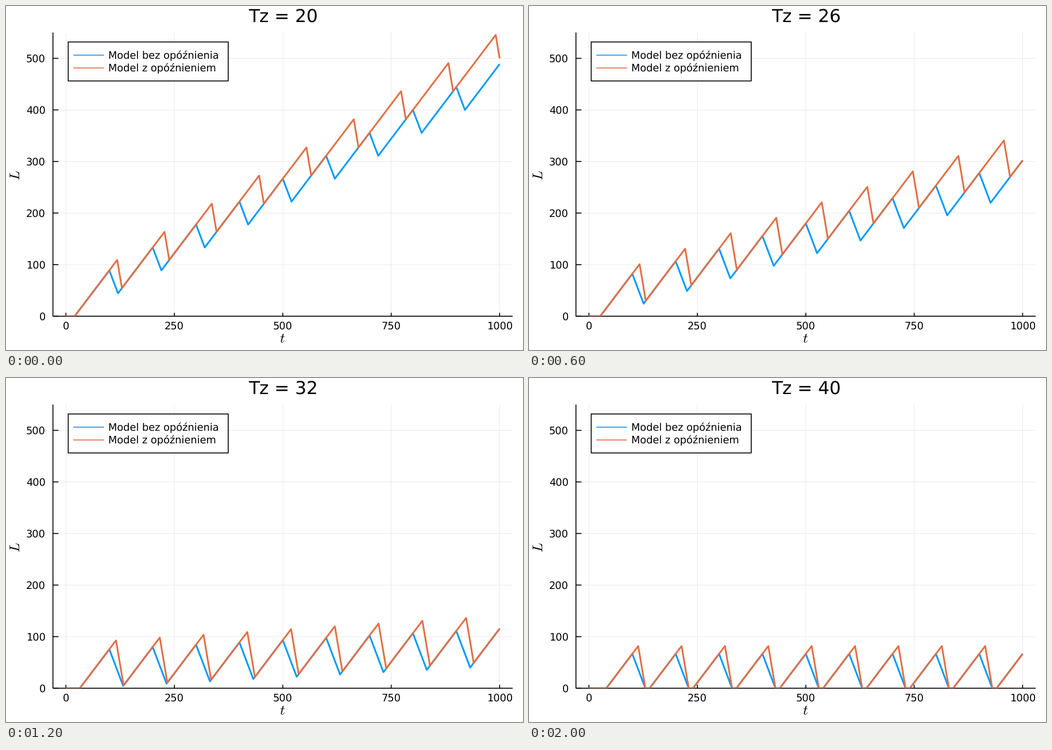
Write a matplotlib script that moves like this. It is 900x600 px and loops after 2100 ms.

```python
import numpy as np
import matplotlib.pyplot as plt
from matplotlib.animation import FuncAnimation
from matplotlib.patches import Rectangle

W, H, DPI = 900, 600, 100
PT = 72 / DPI
LEFT, RIGHT, TOP, BOTTOM = 81.7, 882.0, 46.4, 541.1
BLUE, ORANGE = "#009AFA", "#E26F46"

CYCLE, T_END = 100, 1000
RISE = 10 / 9          # queue growth on red
DISCHARGE = 20 / 9     # queue decay on green, no delay
WAVE_FALL = 5          # queue decay with delay
WAVE_LAG = 1 / 6       # time for the wave to pass one unit of queue

plt.rcParams.update({
    "font.family": "DejaVu Sans",
    "mathtext.fontset": "cm",
    "text.hinting": "none",
    "path.snap": False,
})


def px(t):
    return LEFT + (np.asarray(t) + 30) / 1060 * (RIGHT - LEFT)


def py(v):
    return BOTTOM - np.asarray(v) / 550 * (BOTTOM - TOP)


def queue(green, lag, fall):
    """Corner points of the queue length for one green time."""
    gain = 1 - RISE * lag
    start, base = green, 0.0
    pts = [(0, 0), (green, 0)]
    for c in range(CYCLE, T_END + 1, CYCLE):
        level = base + RISE * (c - start)
        peak = level / gain
        t_peak = c + lag * peak
        pts.append((t_peak, peak))
        start, base = c + green, max(0.0, level - DISCHARGE * green)
        if base > 0:
            low = base / gain
            pts.append((start + lag * low, low))
        else:
            pts += [(t_peak + peak / fall, 0), (start, 0)]
    t, v = np.array(pts).T
    keep = t < T_END
    return np.append(t[keep], T_END), np.append(v[keep], np.interp(T_END, t, v))


fig = plt.figure(figsize=(W / DPI, H / DPI), dpi=DPI, facecolor="white")
ax = fig.add_axes([0, 0, 1, 1])
ax.set(xlim=(0, W), ylim=(H, 0))
ax.axis("off")


def line(x, y, width, color="black", z=2, **kw):
    return ax.plot(x, y, lw=width * PT, color=color, zorder=z,
                   solid_capstyle="butt", **kw)[0]


def label(x, y, s, size=17.78, ha="left", va="baseline", **kw):
    return ax.text(x, y, s, fontsize=size * PT, ha=ha, va=va, zorder=6, **kw)


# Grid, ticks and axes
tick_x, tick_y = 0.012 * (BOTTOM - TOP), 0.012 * (RIGHT - LEFT)
for t in range(0, 1001, 250):
    x = px(t)
    line([x, x], [TOP, BOTTOM], 0.8, alpha=0.1, z=1)
    line([x, x], [BOTTOM - tick_x, BOTTOM], 1.6)
    label(x, 564, str(t), ha="center")
for v in range(0, 501, 100):
    y = py(v)
    line([LEFT, RIGHT], [y, y], 0.8, alpha=0.1, z=1)
    line([LEFT, LEFT + tick_y], [y, y], 1.6)
    label(69, y + 6.5, str(v), ha="right")
line([LEFT, RIGHT], [BOTTOM, BOTTOM], 1.6)
line([LEFT, LEFT], [TOP, BOTTOM], 1.6)
label(481, 580, "$t$", 24.4, "center", "center")
label(17, 295, "$L$", 24.4, "center", "center", rotation=90)

# Legend
ax.add_patch(Rectangle((108.3, 62.7), 278.5, 68, fc="white", ec="black",
                       lw=1.6 * PT, zorder=5))
for y, color, name in ((85.7, BLUE, "Model bez opóźnienia"),
                       (108.1, ORANGE, "Model z opóźnieniem")):
    line([117.2, 170.5], [y, y], 1.6, color, z=6)
    label(178, y + 6.4, name)

# Moving parts
title = label(482.4, 27.4, "", 31.1, "center")
models = [(line([], [], 3, color, z=z, solid_joinstyle="round"), lag, fall)
          for color, z, lag, fall in ((BLUE, 3, 0, DISCHARGE),
                                      (ORANGE, 4, WAVE_LAG, WAVE_FALL))]
frame = Rectangle((LEFT, TOP), RIGHT - LEFT, BOTTOM - TOP,
                  transform=ax.transData)
for curve, _, _ in models:
    curve.set_clip_path(frame)


def update(i):
    green = 20 + i
    title.set_text(f"Tz = {green}")
    for curve, lag, fall in models:
        t, v = queue(green, lag, fall)
        curve.set_data(px(t), py(v))
    return [title] + [m[0] for m in models]


anim = FuncAnimation(fig, update, frames=21, interval=100, repeat=True,
                     repeat_delay=0, blit=False)
plt.show()
```
